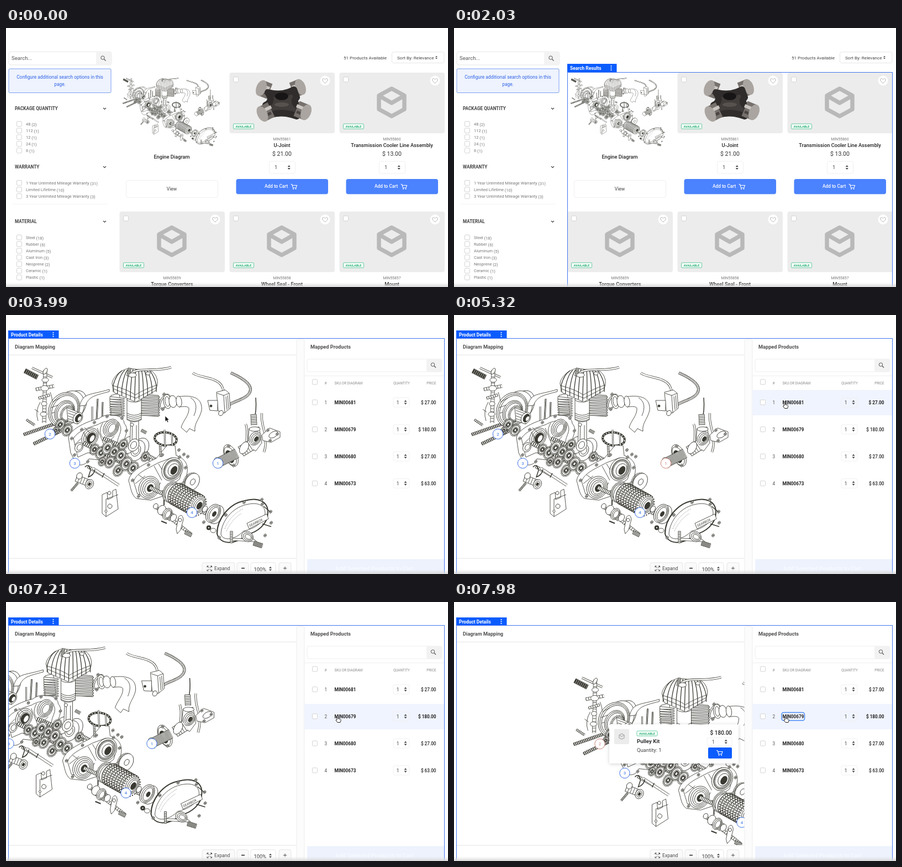
An HTML page that plays this animation: 800x470 px, repeating every 8 s.

```html
<!DOCTYPE html>
<html lang="en">
<head>
<meta charset="utf-8">
<title>Diagram mapping</title>
<style>
  html, body { margin: 0; width: 800px; height: 470px; overflow: hidden; background: #fff; }
  svg { display: block; font-family: Roboto, sans-serif; }
</style>
</head>
<body>
<svg id="stage" width="800" height="470" viewBox="0 0 800 470"></svg>
<script>
const INK = '#3a3932', BLUE = '#0b5cff', LINE = '#e6e6e6';
const times = (n, fn) => Array.from({ length: n }, (_, i) => fn(i)).join('');

// Basic shapes
const rect = (x, y, w, h, fill = '#fff', stroke = 'none', r = 3, more = '') =>
  `<rect x="${x}" y="${y}" width="${w}" height="${h}" rx="${r}" fill="${fill}" stroke="${stroke}" ${more}/>`;
const text = (x, y, str, size, fill = '#444', weight = 400, anchor = 'start') =>
  `<text x="${x}" y="${y}" font-size="${size}" fill="${fill}" font-weight="${weight}" text-anchor="${anchor}">${str}</text>`;
const path = (d, stroke = INK, width = 1, fill = 'none', more = '') =>
  `<path d="${d}" stroke="${stroke}" stroke-width="${width}" fill="${fill}" ${more}/>`;
const dot = (x, y, r, fill, stroke = 'none') =>
  `<circle cx="${x}" cy="${y}" r="${r}" fill="${fill}" stroke="${stroke}"/>`;
const group = (id, body, more = '') => `<g id="${id}" ${more}>${body}</g>`;
const at = (x, y, body, scale = 1) => `<g transform="translate(${x} ${y}) scale(${scale})">${body}</g>`;

// Icons and controls
const box = (x, y) => rect(x, y, 9, 9, '#fff', '#d3d3d3', 1.5);
const stepper = (x, y) => path(`M${x - 2.5} ${y - 1}l2.5-3 2.5 3zm0 2l2.5 3 2.5-3z`, 'none', 0, '#444');
const lens = (x, y) => path(`M${x + 1.5} ${y + 1.5}l3 3`, '#555', 1.2) +
  `<circle cx="${x - 1}" cy="${y - 1}" r="3.2" fill="none" stroke="#555"/>`;
const cart = (x, y) => at(x, y, path('M-5-4h2l2 6.5h5.5l1.5-4.5h-8', '#fff', 1.1) +
  dot(-.5, 4.6, 1, '#fff') + dot(4, 4.6, 1, '#fff'));
const parcel = (x, y, scale = 1) => at(x, y,
  path('M0-25L23-12.5V12.5L0 25-23 12.5V-12.5ZM-21-11L0 1 21-11', '#b9b9b9', 7.5, 'none', 'stroke-linejoin="round"'), scale);
const badge = (x, y) => rect(x, y, 37, 9, '#fff', '#35bd83', 1.5, 'stroke-width=".8"') +
  text(x + 18.5, y + 6.6, 'AVAILABLE', 5.6, '#1fae70', 700, 'middle');
const quantity = (x, y, w, h, size) => rect(x, y, w, h, 'none', '#f0f0f0') +
  text(x + w * .2, y + h / 2 + size * .36, '1', size, '#444') + stepper(x + w * .76, y + h / 2);
const tag = (x, y, w, label) => rect(x, y, w, 15, BLUE, 'none', 0) + text(x + 5, y + 10.5, label, 8.4, '#fff', 700) +
  times(3, i => dot(x + w - 10, y + 4 + i * 3.5, 1.1, '#fff'));

// Engine drawing
const part = (d, fill = '#fff', more = '') => `<path d="${d}" fill="${fill}" ${more}/>`;
const disc = (x, y, rx, ry = rx, turn = 30, fill = '#fff', more = '') =>
  `<ellipse cx="${x}" cy="${y}" rx="${rx}" ry="${ry}" fill="${fill}" transform="rotate(${turn} ${x} ${y})" ${more}/>`;
const bar = (d, width, dash) => path(d, INK, width) + path(d, '#fff', width - 1.6) +
  (dash ? path(d, INK, width - 1.6, 'none', `stroke-dasharray="${dash}"`) : '');
const gear = (x, y, r) =>
  disc(x, y, r * .72, r, 30, '#fff', 'stroke-width="3" stroke-dasharray="1 1.2"') +
  disc(x, y, r * .6, r * .84) + disc(x, y, r * .4, r * .55) + disc(x, y, r * .28, r * .4, 30, INK) + disc(x, y, r * .16, r * .24);
const gears = list => list.map(g => gear(...g)).join('');
const bolts = list => list.map(([x, y]) => disc(x, y, 2.2, 2.8) + disc(x, y, .8, 1, 30, INK)).join('');
const rings = (x, y, rx, ry, n, shrink) => times(n, i => disc(x + i * .6, y + i * .3, rx - i * shrink, ry - i * shrink));

const engine = [
  // steering stem and chains
  bar('M34 101L57 113', 9, '3 .5'), bar('M47 96L84 113', 4),
  bar('M71 100L69 196', 7, '.8 5'), bar('M54 135L87 129', 6, '1 4'), bar('M59 151L79 145', 5, '1 3'),
  disc(71, 102, 3, 6), disc(71, 118, 6, 4, 0), disc(70, 133, 7, 5, 0), disc(69, 161, 5, 4, 0), disc(68, 180, 6, 4, 0),
  part('M62 158Q52 175 58 192M80 140Q88 160 80 178M52 171l7 5', 'none'),
  bar('M32 217L98 194', 6, '1.8 1.4'), bar('M50 234L100 210', 6, '1.8 1.4'), bar('M37 190L52 200', 4, '1 2'),
  // alternator
  disc(123, 165, 20, 30), disc(115, 168, 25, 32), rings(105, 172, 27, 33, 3, 2.5),
  part('M84 158l14-8M82 168l16-6M83 178l14-4M88 190l14-4', 'none'), rings(106, 176, 17, 22, 3, 2),
  disc(111, 179, 10, 14, 30, '#fff', 'stroke-width="5" stroke-dasharray="1 1.3"'),
  part('M110 168L130 176V198L112 192Z'), part('M112 173l17 6M112 178l17 6M112 183l17 6M112 188l17 6', 'none'),
  disc(130, 187, 8, 11), disc(131, 187, 5, 8, 30, INK), disc(133, 188, 3, 5),
  gears([[98, 199, 11], [111, 209, 11], [90, 210, 7]]),
  part('M133 165C140 140 152 146 187 135v4C160 146 150 148 144 164z'),
  bar('M166 152L164 190', 3, '1 1'), bar('M175 158L174 190', 3, '1 1'), bar('M156 166L156 196', 3),
  // left crankcase
  part('M113 222C118 205 150 192 168 188C182 176 214 180 214 197C224 207 214 222 212 234L178 264 150 261C146 274 126 278 122 260L117 250Z'),
  part('M122 224C130 210 150 204 166 199C180 190 206 188 206 200C212 210 202 220 202 230L168 252 148 250 130 258Z'),
  rings(190, 205, 13, 17, 4, 2.5), rings(152, 222, 14, 18, 3, 3), disc(154, 223, 7, 10, 30, INK), disc(156, 224, 4, 7),
  disc(132, 240, 7, 9), disc(133, 240, 4, 6), part('M165 205l12 30M175 196q-12 20 8 34M140 212l18 34M124 236l12-12M196 220l-22 22M142 204l10 10', 'none'),
  bolts([[119, 224], [137, 208], [160, 195], [183, 184], [210, 187], [218, 210], [124, 254], [148, 266]]),
  // gear train and crank
  bar('M140 232L243 285', 8, '1.5 2'), bar('M176 224L262 262', 8, '1.5 2'),
  disc(243, 242, 14, 20), disc(236, 246, 14, 20), disc(235, 246, 8, 11), disc(235, 246, 5, 7), disc(222, 236, 12, 17),
  gears([[160, 244, 10], [172, 250, 12], [184, 241, 13], [196, 248, 11], [208, 255, 12], [188, 267, 11],
    [203, 282, 11], [218, 270, 13], [230, 278, 12], [174, 266, 8], [212, 235, 10], [252, 257, 9]]),
  bar('M255 254L274 264', 6, '1 2'),
  // barrel, piston and rod
  part('M190 146L205 142 210 180 190 182Z'), part('M242 143L276 146 276 184 246 182Z'),
  times(8, i => part(`M188 ${148 + i * 4.7}l26 ${3 - i / 3}v2l-26-${i / 4}zM243 ${146 + i * 4.7}l35 2v2l-35-1z`)),
  part('M226 190L224 236Q232 246 240 236L240 190Z'), part('M229 200L228 226M236 200L236 226', 'none'), disc(231, 236, 9, 12), disc(231, 236, 5, 7),
  part('M219 152V190Q232 198 245 190V152Z'), disc(232, 153, 13, 5, 0),
  times(4, i => part(`M219 ${178 + i * 3.5}q13 8 26 0`, 'none')), disc(228, 199, 3, 3),
  bar('M245 209L254 214', 6, '1 1'),
  // cylinder head
  part('M192 125C192 115 205 100 222 97L262 101C272 106 275 118 274 126L271 137 235 158 196 141Z'),
  times(11, i => {
    const x = 194 + i * 7.8, y = 144 - Math.abs(x - 233) * .42;
    return part(`M${210 + i * 5} ${101 - Math.sin(i * .3) * 3}Q${199 + i * 7} ${108 + i * .4} ${x} ${y}v12`, 'none', 'stroke-width="1.3"');
  }),
  part('M193 128Q222 136 234 145Q250 135 273 127M195 134L235 151 272 132', 'none'),
  bar('M226 106C240 94 270 104 299 95', 4), bar('M221 111L224 96', 6, '1 1'), disc(229, 109, 7, 4, 0), disc(257, 106, 4, 3, 0),
  // exhaust
  rings(287, 157, 8, 15, 2, 2), disc(292, 157, 7, 13, -8), disc(292, 157, 4, 9, -8), disc(302, 157, 7, 11, -8),
  part('M313 148C338 145 356 150 354 173C350 190 340 196 342 211L332 206 327 213 317 204C320 192 332 182 331 169C329 165 320 166 313 167Z'),
  disc(313, 157, 5, 10, -8), part('M334 150Q350 160 340 183', 'none'), bolts([[286, 144], [284, 171]]),
  // wiring and coil
  bar('M338 105C348 114 381 112 390 128Q396 138 392 148', 4), bar('M407 105Q450 124 441 141C433 154 412 156 403 164', 5, '.6 1.2'),
  part('M381 140L397 136 404 142 406 169 395 178 384 174Z'), part('M365 155h18v19l-14-1ZM382 142l12 4 2 32M394 146l10-4M398 148l2 24M401 146l2 24'),
  disc(371, 165, 2, 2, 0, INK), disc(389, 178, 4, 5),
  // carburettor
  part('M452 150Q454 174 449 190', 'none', 'stroke-width="1.5"'), bar('M434 198C440 214 432 230 437 250', 4), bar('M463 178C460 205 477 216 467 249', 4),
  bar('M448 180L449 200', 11, '1 2'), part('M440 206L458 203 463 232 452 247 437 239Z'), disc(450, 207, 10, 4, 0), rings(451, 224, 10, 13, 3, 2.5),
  disc(453, 225, 3, 5, 30, INK), part('M463 218L477 205 496 212 496 222 480 231 465 228Z'), disc(484, 217, 5, 9, 60), bolts([[474, 209], [491, 216], [478, 228]]),
  bar('M425 248L444 236', 20, '.8 4'), disc(431, 241, 7, 12), disc(407, 255, 11, 21, -25), disc(406, 256, 9, 18, -25), disc(405, 257, 6, 12, -25, INK),
  bar('M384 268L418 251', 18, '1 1.2'), disc(384, 268, 7, 10, -25), bolts([[403, 238], [412, 273]]),
  // gasket and right crankcase
  disc(289, 225, 20, 12, 8, 'none', 'stroke-width="4"'), disc(289, 225, 20, 12, 8, 'none', 'stroke="#fff" stroke-width="1.5" stroke-dasharray="2 3"'),
  part('M222 301C224 282 252 270 272 260L292 236 306 237 308 255C330 262 332 280 324 300L292 326 262 336 236 333C226 326 226 312 222 301Z'),
  bar('M287 208L288 240', 3), bar('M300 214L301 238', 3), bar('M279 235L280 258', 4, '1 2'),
  part('M231 302C236 286 258 278 276 268L300 259C320 268 320 282 314 298L286 318 258 327 238 325Z'),
  part('M234 306L252 292M240 290l14 10M268 274l14 26M276 270l12 20M270 322l10-18', 'none'),
  rings(301, 280, 18, 22, 2, 3), disc(301, 280, 13, 17, 30, '#fff', 'stroke-width="4" stroke-dasharray="1 1"'), disc(303, 281, 9, 12), disc(304, 282, 5, 8, 30, INK),
  rings(259, 313, 18, 21, 4, 3), disc(261, 314, 5, 7, 30, INK),
  bolts([[229, 300], [240, 329], [258, 272], [283, 254], [314, 258], [325, 277], [322, 253], [329, 257], [313, 245]]),
  // clutch
  bar('M260 313L384 370', 7, '1 2'), gear(334, 302, 16), disc(337, 303, 12, 17), disc(338, 303, 4, 6),
  gear(299, 321, 19), disc(304, 324, 14, 19), disc(305, 324, 9, 13, 30, '#fff', 'stroke-width="4" stroke-dasharray="1 1"'),
  times(9, i => disc(309 + i * 4.5, 325 + i * 2.5, 14, 21, 30, '#fff', 'stroke-width="1.4"') +
    disc(311 + i * 4.5, 326 + i * 2.5, 13.5, 20, 30, '#fff', 'stroke-width="2" stroke-dasharray="2 2.5"')),
  rings(348, 345, 11, 17, 3, 2.5), disc(350, 346, 4, 7, 30, INK), disc(360, 352, 4, 6),
  disc(380, 362, 13, 18), rings(375, 360, 12, 18, 3, 2.5), disc(377, 361, 3, 5, 30, INK),
  disc(367, 386, 4, 4, 0, INK), disc(367, 386, 1.5, 1.5), disc(375, 391, 5, 4, 0), bolts([[358, 376], [394, 375], [413, 387]]),
  // outer cover and kick lever
  part('M382 397C382 370 404 342 432 337C456 330 474 338 474 358C474 380 455 394 435 399C417 416 388 419 382 397Z', '#fff', 'stroke-width="2"'),
  part('M389 398C390 374 409 350 435 344C456 339 469 345 469 360C466 378 449 388 430 392C415 408 393 411 389 398Z'),
  part('M436 378L472 361 475 370 440 388Z'), `<text x="441" y="384.5" font-size="6" stroke="none" fill="${INK}" transform="rotate(-26 441 384.5)">GEARBOX</text>`,
  part('M396 388Q404 366 428 352M399 392Q408 372 426 360', 'none', 'stroke-dasharray="1 2"'),
  bar('M408 407L448 409 457 417', 5), bar('M448 414L464 419', 9, '1.2 .8'), rings(437, 402, 11, 9, 3, 2.5), bar('M408 392L408 414', 5, '1 2'),
  bolts([[386, 404], [398, 363], [431, 340], [464, 343], [479, 357], [480, 377], [469, 400], [463, 335]]),
  part('M466 347L478 357M464 379l16 5', 'none', 'stroke-width="1.5"'),
  // selector and bracket
  bar('M127 296L155 307', 13, '.8 4'), disc(151, 307, 7, 9), disc(151, 307, 4, 6), disc(151, 307, 2, 3, 30, INK), bar('M130 305L118 319', 4, '1 1'), disc(133, 292, 5, 6),
  bar('M148 275L176 291', 6, '1 2'), bar('M157 278L204 309', 5), part('M143 276q7-8 10 6l-4 12q10-3 12-14M178 287l-4 8', 'none', 'stroke-width="1.5"'),
  part('M174 326L183 322 184 335 193 331 193 319 199 316 203 352 181 366 174 360ZM181 366V334l22-8'), disc(187, 323, 3, 3), disc(188, 347, 4, 4), disc(181, 356, 2, 2),
  bar('M268 346L335 398', 6, '1 3'), bar('M279 353L301 368', 15, '1 3'), disc(282, 354, 7, 9), rings(292, 361, 8, 11, 3, 2), disc(303, 368, 5, 7),
  part('M312 367Q319 358 321 371L316 390 310 397 308 389Z'), disc(315, 372, 3, 3), disc(271, 347, 4, 5), bar('M324 394L336 400', 7, '1 1'), part('M286 345v-10M281 374l10 4', 'none', 'stroke-width="2"')
].join('');

// Product list
const filters = (title, y, first, items) => text(16, y + 3, title, 8.2, '#444', 700) +
  path(`M176 ${y - 1}l2.5 2.5 2.5-2.5`, '#444', 1.2) +
  items.map(([name, count], i) => box(19.5, first + i * 12.1 - 4.5) +
    `<text x="36" y="${first + i * 12.1 + 2.5}" font-size="7.5" fill="#777">${name} <tspan dy="1">(${count})</tspan></text>`).join('');

const card = (x, y, sku, name, price) => {
  const mid = x + 95;
  return rect(x, y, 190.5, 110, '#ececec', 'none', 4) + box(x + 7, y + 8) + dot(x + 173, y + 14.5, 9, '#fff') +
    path(`M${x + 173} ${y + 19}c-9-6-3-11 0-6.5c3-4.5 9 .5 0 6.5z`, '#aaa', .9) +
    (sku === 'MIN55861' ? joint : parcel(mid - .5, y + 54)) + badge(x + 7, y + 93) +
    text(mid, y + 122.5, sku, 6.9, '#777', 400, 'middle') + text(mid, y + 135, name, 9.25, '#222', 500, 'middle') +
    text(mid, y + 150.5, price, 10.5, '#333', 400, 'middle') + quantity(mid - 23, y + 161, 47, 22, 9.3) +
    rect(x + 12, y + 193, 166.5, 27.5, '#4b82fd', 'none', 4) +
    text(x + 63.5, y + 209.3, 'Add to Cart', 8.3, '#fff', 500) + cart(x + 116, y + 206.5);
};
const cap = (x, y, dx, dy) => path(`M${x} ${y}l${dx} ${dy}`, '#77716d', 29) +
  path(`M${x} ${y - 5}l${dx} ${dy}`, '#c9c4bf', 6) + path(`M${x} ${y + 6}l${dx} ${dy}`, '#4a4543', 5) +
  disc(x + dx, y + dy, 9, 15, Math.atan2(dy, dx) * 57.3, '#aaa5a0');
const joint = cap(518, 113, 15, -6) + cap(477, 115, -15, -6) +
  path('M474 117Q500 124 521 112L526 126Q517 136 533 144L526 160Q500 150 477 158L470 140Q485 133 474 117Z', '#2f2c2b', 12, '#413d3b', 'stroke-linejoin="round"') +
  disc(499, 124, 12, 7, 0, '#171515') + disc(499, 139, 13, 4, 0, '#58524f') + cap(480, 148, -16, 8) + cap(526, 146, 17, 7);

const list = rect(5, 43, 186, 24, '#fff', LINE, 4) + rect(163, 43.5, 28, 23, '#f3f3f3') + lens(176, 55) + text(10, 58.3, 'Search...', 9.6, '#555') +
  rect(5, 74, 185, 43.5, '#eef3fd', '#7c9df0', 2) + text(97.5, 92, 'Configure additional search options in this', 8.4, '#2e62e6', 400, 'middle') +
  text(97.5, 105, 'page.', 8.4, '#2e62e6', 400, 'middle') +
  filters('PACKAGE QUANTITY', 146, 174, [[48, 2], [112, 1], [12, 1], [24, 1], [6, 1]]) +
  filters('WARRANTY', 252, 281, [['1 Year Unlimited Mileage Warranty', 31], ['Limited Lifetime', 10], ['3 Year Unlimited Mileage Warranty', 3]]) +
  filters('MATERIAL', 351, 380, [['Steel', 18], ['Rubber', 6], ['Aluminum', 5], ['Cast Iron', 3], ['Neoprene', 2], ['Ceramic', 1], ['Plastic', 1]]) +
  path('M12 319.5H184', '#f3f3f3') + text(611, 56.5, '51 Products Available', 8.1) +
  rect(698.5, 43.5, 94.5, 20, '#fff', LINE) + text(708, 56.5, 'Sort By: Relevance', 8.1) + at(779, 53.5, stepper(0, 0), .75) +
  '<use href="#engine" transform="translate(199.5 55) scale(.377)" stroke-width="1.1"/>' +
  text(300, 237, 'Engine Diagram', 9.25, '#222', 500, 'middle') + rect(217.5, 276.5, 166, 31, '#fff', '#efefef', 4) + text(300, 295, 'View', 8.6, '#444', 400, 'middle') +
  card(404.5, 81, 'MIN55861', 'U-Joint', '$ 21.00') + card(603.5, 81, 'MIN55860', 'Transmission Cooler Line Assembly', '$ 13.00') +
  card(205.5, 333, 'MIN55859', 'Torque Converters', '') + card(404.5, 333, 'MIN55858', 'Wheel Seal - Front', '') + card(603.5, 333, 'MIN55857', 'Mount', '') +
  group('listOutline', rect(205.5, 80.5, 588, 400, 'none', '#3f74ee', 0)) + group('listTag', tag(205, 65, 89.5, 'Search Results'));

// Product details
const markers = [[383.5, 269], [79.5, 216], [124.5, 269], [336.5, 358.5]];
const products = [['MIN00681', '$ 27.00'], ['MIN00679', '$ 180.00'], ['MIN00680', '$ 27.00'], ['MIN00673', '$ 63.00']];
const row = ([sku, price], i) => {
  const y = 158.5 + i * 49;
  return rect(540, y - 22.5, 253, 46, '#f0f4fe', 'none', 0, `id="row${i}"`) + box(554.5, y - 4.5) + text(576.5, y + 3, i + 1, 8.2, '#555') +
    rect(593, y - 7, 41.5, 14.5, 'none', '#4a8af6', 3.5, `id="focus${i}" stroke-width="1.5"`) + text(594.5, y + 3, sku, 8.2, '#222', 700) +
    quantity(701, y - 8.5, 29, 17, 8.4) + `<text id="price${i}" x="778.5" y="${y + 3}" font-size="8.2" fill="#222" text-anchor="end">${price}</text>`;
};
const key = (x, w) => rect(x, 449.5, w, 24, '#fafafa', LINE, 3);
const details = group('canvas', group('pan',
    '<use href="#engine" stroke-width=".85"/>' +
    markers.map(([x, y], i) => group('marker' + i, dot(x, y, 9.2, '#fff', 'currentColor') + text(x, y + 2.9, i + 1, 8, 'currentColor', 400, 'middle'))).join('')),
    'clip-path="url(#view)"') +
  text(16, 61, 'Diagram Mapping', 9.2, '#505050', 700) + path('M5 72.5H526M5 441.5H526', LINE) +
  rect(526, 44, 14, 430, '#fcfcfc', '#ededed', 3) + text(551, 61, 'Mapped Products', 9.2, '#505050', 700) +
  rect(545, 80, 244, 23, '#fff', '#eee') + rect(761, 80, 28, 23, '#f2f2f2') + lens(773.5, 91) + path('M540 110.5H793', '#eee') +
  group('rows', box(554.5, 117) + text(576.5, 126, '#', 6.3, '#888') + text(594.5, 126, 'SKU OR DIAGRAM', 6.3, '#888') +
    text(701, 126, 'QUANTITY', 6.3, '#888') + text(778.5, 126, 'PRICE', 6.3, '#888', 400, 'end') + products.map(row).join('')) +
  key(355, 59) + path('M364 458v-2.5h2.5M370 455.5h2.5v2.5M372.5 462v2.5h-2.5M366.5 464.5h-2.5v-2.5M364.5 456l3 3M372 456l-3 3M372 464l-3-3M364.5 464l3-3', '#444') +
  text(377, 462.8, 'Expand', 8.6) + key(418, 21) + path('M426 459.5h6', '#222', 1.5) + rect(443, 449.5, 45, 24, '#fff', LINE) +
  text(448.5, 464.5, '100%', 9.4, '#333') + stepper(478.5, 460.5) + key(494, 22) + path('M502 459.5h6M505 456.5v6', '#555') +
  rect(545, 443, 248, 30, '#edf2fd', 'none', 0) + text(667, 463.5, 'Add Selected Products to Cart', 10.5, '#f8faff', 500, 'middle') +
  group('spinners', '') +
  group('popup', rect(281, 222, 234, 71, '#fff', 'none', 3, 'filter="url(#shadow)"') + rect(290, 230.5, 27, 27.5, '#ececec', 'none', 2) + parcel(303.5, 244, .2) +
    badge(331, 234) + '<text id="popName" x="331" y="256.3" font-size="9.7" font-weight="700" fill="#333"></text>' + text(331, 271.5, 'Quantity: 1', 9.4) +
    '<text id="popPrice" x="503" y="240.5" font-size="10" font-weight="500" fill="#222" text-anchor="end"></text>' +
    quantity(458, 246, 45, 15, 8.5) + rect(460, 264, 43, 20, BLUE, 'none', 2) + cart(480, 273.5)) +
  group('detailTag', tag(4, 28, 91.5, 'Product Details')) + rect(4.5, 42.5, 789, 450, 'none', '#3f74ee', 0);

stage.innerHTML = `<defs><g id="engine" stroke="${INK}">${engine}</g>
  <clipPath id="view"><rect x="5" y="73.5" width="521" height="367.5"/></clipPath>
  <filter id="shadow"><feDropShadow dx="0" dy="1" stdDeviation="3" flood-opacity=".18"/></filter>
  <linearGradient id="edge" x2="0" y2="1"><stop stop-color="#ddd" stop-opacity="0"/><stop offset="1" stop-color="#d8d8d8"/></linearGradient></defs>` +
  group('listPage', list) + group('detailPage', details) + rect(0, 462, 800, 8, 'url(#edge)', 'none', 0) +
  group('status', rect(-10, 457, 67.5, 16, '#0c0c0c', 'none', 3) + text(53, 466.3, '-line-assembly', 8.2, '#fff', 500, 'end')) +
  group('pointer', group('arrow', path('M0 0V10.5L2.5 8.3 4.2 12 6 11.2 4.4 7.600H7.5Z', '#fff', .7, '#111')) +
    group('hand', path('M-1 1q1.5-1.5 2 .5v4l4 1q1.5.5 1 3l-1 3h-5l-3-4q0-1.5 2-.5z', '#222', 1, '#fff')));

// Motion
const $ = id => document.getElementById(id);
const clamp = v => Math.min(1, Math.max(0, v));
const ease = v => v * v * (3 - 2 * v);
const show = (id, on) => { $(id).style.display = on ? '' : 'none'; };
const move = (id, x, y) => $(id).setAttribute('transform', `translate(${x} ${y})`);
const track = (t, keys) => {
  let i = 0;
  while (i < keys.length - 2 && t > keys[i + 1][0]) i++;
  const [a, ax, ay] = keys[i], [b, bx, by] = keys[i + 1], k = ease(clamp((t - a) / (b - a)));
  return [ax + (bx - ax) * k, ay + (by - ay) * k];
};
const pointerKeys = [[2040, 812, 216], [2450, 288, 183], [4300, 288, 183], [5040, 598.5, 157], [6600, 598.5, 157], [7080, 600, 206]];
const panKeys = [[5360, 0, 0], [5780, -119.5, -12], [7380, -119.5, -12], [7840, 184.5, 41.5]];
const slideTag = (id, t) => {
  const k = clamp(t / 300);
  $(id).style.opacity = k;
  move(id, 0, 13 * (1 - k * k));
};
const spinner = (x, y, t) => times(6, i => {
  const angle = i * Math.PI / 3 - Math.PI / 2, age = (((t - 3010) / 900 - i / 6) % 1 + 1) % 1;
  return `<circle cx="${x + 9 * Math.cos(angle)}" cy="${y + 8 * Math.sin(angle)}" r="${4.2 - 3.6 * age}" fill="#625c70" opacity="${1 - age}"/>`;
});

function frame() {
  const t = performance.now() % 8000, onList = t < 2870, loaded = t > 3700;
  const [x, y] = track(t, pointerKeys);
  const hover = loaded && x > 540 ? Math.floor((y - 134) / 49) : -1;
  const focus = t > 7350 ? 1 : t > 5360 && hover === 0 ? 0 : -1;
  show('listPage', onList);
  show('detailPage', !onList);
  show('listOutline', t >= 1050);
  slideTag('listTag', t - 1060);
  slideTag('detailTag', t - 2950);
  show('canvas', loaded);
  show('rows', loaded);
  $('spinners').innerHTML = loaded ? '' : spinner(265, 269, t) + spinner(666.5, 161, t);
  move('pan', ...track(t, panKeys));
  products.forEach((_, i) => {
    show('row' + i, i === hover);
    show('focus' + i, i === focus);
    $('price' + i).setAttribute('font-weight', i === hover ? 700 : 500);
    $('marker' + i).style.color = i === hover ? '#cf8478' : '#3a6fe3';
  });
  show('popup', focus === 0 && t > 5880 || t > 7880);
  $('popName').textContent = focus ? 'Pulley Kit' : 'Intake Kit';
  $('popPrice').textContent = products[Math.max(0, focus)][1];
  show('status', t > 2180 && t < 3300);
  const pointing = onList || x > 593;
  show('pointer', t > 2040);
  show('hand', pointing);
  show('arrow', !pointing);
  move('pointer', x, y);
  requestAnimationFrame(frame);
}
frame();
</script>
</body>
</html>
```
